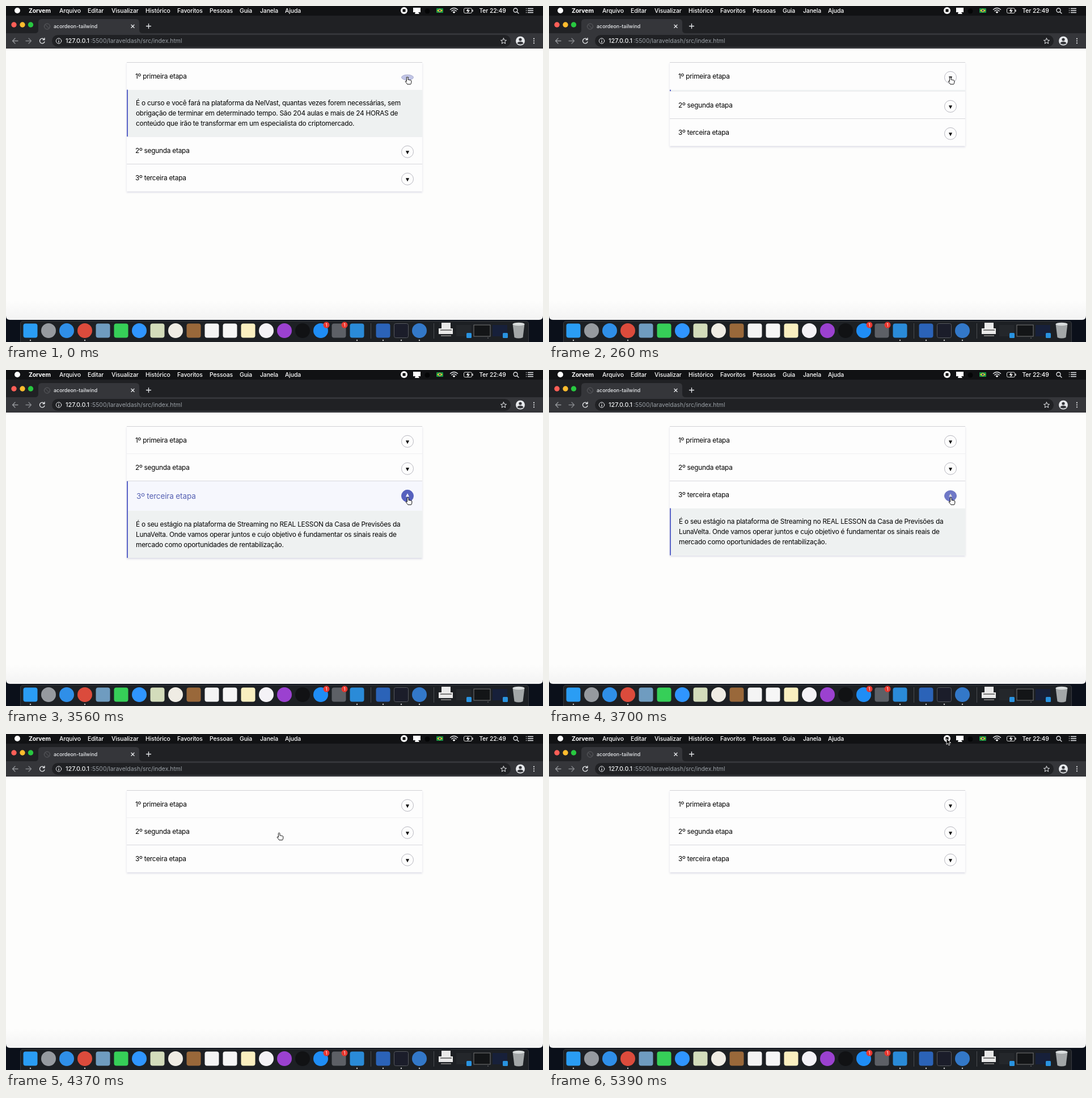
Write an HTML page that moves like this. It is 947 px wide and 592 px high and loops after 5420 ms.

```html
<!DOCTYPE html>
<html lang="pt-BR">
<head>
<meta charset="utf-8">
<title>Acordeon</title>
<style>
html, body { margin: 0; width: 100%; height: 100%; overflow: hidden; background: #0b101a; }
svg { display: block; width: 947px; height: 592px; }
text { font-family: Inter, Roboto, "Liberation Sans", sans-serif; white-space: pre; }
.menu text { font-size: 10.4px; fill: #fff; letter-spacing: -.01em; font-weight: 500; }
.card text { font-size: 11.85px; letter-spacing: -.02em; fill: #000; }
.line { fill: none; stroke: #e8eaed; stroke-width: 1.3; stroke-linecap: round; stroke-linejoin: round; }
</style>
</head>
<body>
<svg id="stage" viewBox="0 0 947 592">
  <defs>
    <linearGradient id="pageFill" x2="0" y2="1">
      <stop offset=".93" stop-color="#fdfdfc"/><stop offset="1" stop-color="#f3f3f3"/>
    </linearGradient>
    <filter id="shadow" x="-5%" y="-10%" width="110%" height="125%">
      <feDropShadow dx="0" dy="2" stdDeviation="1.8" flood-color="#3c3c78" flood-opacity=".18"/>
    </filter>
    <clipPath id="panelClip"><rect id="clipBox" x="213" width="521"/></clipPath>
  </defs>

  <rect width="947" height="592" fill="#0b101a"/>
  <path d="M0 75H947V546Q947 553 940 553H7Q0 553 0 546Z" fill="url(#pageFill)"/>

  <g id="menu" class="menu">
    <rect width="947" height="17" fill="#111214"/>
    <circle cx="20" cy="8" r="5" fill="#fff"/>
    <circle cx="702" cy="8" r="6" fill="#fff"/>
    <rect x="699.5" y="5.5" width="5" height="5" rx=".6" fill="#000"/>
    <path d="M718 3H731V11H727L729 14H721L722 11H718Z" fill="#fff"/>
    <circle cx="743" cy="9" r="4.5" fill="#050607"/>
    <rect x="759" y="4" width="12" height="8" rx="1" fill="#189447"/>
    <path d="M760 8L765 5 770 8 765 11Z" fill="#f5d327"/>
    <circle cx="765" cy="8" r="1.7" fill="#27408b"/>
    <path class="line" d="M783.5 6.3Q790 .6 796.5 6.3M785.8 8.7Q790 5 794.2 8.7"/>
    <path d="M787.5 10.5Q790 8.5 792.5 10.5L790 13Z" fill="#fff"/>
    <rect x="807.5" y="4" width="14" height="8.5" rx="2" fill="none" stroke="#ddd"/>
    <path d="M823 6.5V10" stroke="#ddd" stroke-width="1.5"/>
    <path d="M815.5 4L811.5 9H814.5L813.5 13 818 7.5H815Z" fill="#fff"/>
    <circle cx="898.5" cy="7.5" r="3.5" class="line"/><path class="line" d="M901 10.2L904 13"/>
    <path class="line" d="M920.5 4.5H929.5M920.5 8H929.5M920.5 11.5H929.5M917.5 4.5H917.6M917.5 8H917.6M917.5 11.5H917.6"/>
  </g>

  <g id="browser">
    <rect y="17" width="947" height="31" fill="#202124"/>
    <rect y="48" width="947" height="27" fill="#35363a"/>
    <path d="M51 48Q57 48 57 42V29Q57 23 63 23H229Q235 23 235 29V42Q235 48 241 48Z" fill="#35363a"/>
    <circle cx="14" cy="33" r="4.7" fill="#ff5f57"/>
    <circle cx="29" cy="33" r="4.7" fill="#febc2e"/>
    <circle cx="43.5" cy="33" r="4.7" fill="#28c840"/>
    <g fill="none" stroke="#5d5e62"><circle cx="72.5" cy="36" r="5"/><path d="M69 32.5L76 39.5"/></g>
    <text x="84" y="38.5" font-size="8.9" font-weight="500" fill="#e8eaed">acordeon-tailwind</text>
    <path class="line" d="M221 33.2L226 38.2M226 33.2L221 38.2M247.5 35.5H255.5M251.5 31.5V39.5"/>
    <path class="line" d="M21 61.5H11.5M16 57L11.5 61.5 16 66" style="stroke:#96989c"/>
    <path class="line" d="M35 61.5H44.5M40 57L44.5 61.5 40 66" style="stroke:#85878b"/>
    <path class="line" d="M67.5 59A4.4 4.4 0 1 0 68 63M68 56.5V59.5H65"/>
    <rect x="81" y="51" width="809" height="21" rx="10.5" fill="#202124"/>
    <circle cx="93" cy="61.5" r="4.7" class="line" style="stroke-width:1"/>
    <path class="line" d="M93 61.3V64M93 59V59.1"/>
    <text y="65.3" font-size="10.4" fill="#9aa0a6"><tspan x="105" fill="#f1f3f4" font-size="10.8" font-weight="500">127.0.0.1</tspan><tspan x="149">:5500/laraveldash/src/index.html</tspan></text>
    <path class="line" style="stroke-width:1" d="M877.5 56.7L879 60.1 882.5 60.4 879.8 62.7 880.7 66.2 877.5 64.3 874.3 66.2 875.2 62.7 872.5 60.4 876 60.1Z"/>
    <circle cx="907" cy="61.5" r="8" fill="#e8eaed"/>
    <circle cx="907" cy="59" r="2.6" fill="#35363a"/>
    <path d="M901.5 66Q902.5 62.7 907 62.7T912.5 66Q907 69.5 901.5 66Z" fill="#35363a"/>
    <g fill="#e8eaed"><circle cx="931" cy="57.7" r="1.1"/><circle cx="931" cy="61.5" r="1.1"/><circle cx="931" cy="65.3" r="1.1"/></g>
  </g>

  <g id="dock">
    <path d="M25.5 592V560Q25.5 555.5 30 555.5H917Q921.5 555.5 921.5 560V592" fill="#1d2024" stroke="#383b3f"/>
    <path d="M643.5 559V586M754.5 559V586" stroke="#484b4f"/>
  </g>

  <g id="card" class="card">
    <rect id="cardBox" x="213" y="99" width="521" fill="#fdfdfd" filter="url(#shadow)"/>
    <rect id="openHeader" x="213" width="521" fill="#f6f7fd"/>
    <g clip-path="url(#panelClip)">
      <rect id="panelBox" x="213" width="521" height="83" fill="#eef1f1"/>
      <text id="panelText"></text>
    </g>
    <rect id="accent" x="213" width="2" fill="#5a64c8"/>
    <path d="M213 99.5H734" stroke="#d2d2d6"/>
  </g>

  <path id="hand" fill="#fff" stroke="#111" stroke-linejoin="round" d="M-1.6 1Q-1.6-.3-.3-.3 1-.3 1 1V4.5Q2 3.8 3 4.8 4 4.2 4.9 5.2 6.2 4.8 6.8 6V9Q6.6 11 5.6 12.4H-.2Q-1.6 10.4-3.6 8-4 6.6-2.8 6.6L-1.6 7.6Z"/>
  <path id="arrow" fill="#000" stroke="#fff" stroke-width=".9" d="M0 0V10.5L2.5 8.2 4 12 6 11 4.4 7.6H7.6Z"/>
</svg>

<script>
const LOOP = 5420, TOP = 99.5, ROW = 48, OPEN_ROW = 52.5, PANEL = 83;
const FULL = 476;      // max-height of an open panel
const DURATION = 500;
const INDIGO = [86, 97, 190];

const titles = ["1º primeira etapa", "2º segunda etapa", "3º terceira etapa"];
const bodies = {
  0: ["É o curso e você fará na plataforma da NelVast, quantas vezes forem necessárias, sem",
      "obrigação de terminar em determinado tempo. São 204 aulas e mais de 24 HORAS de",
      "conteúdo que irão te transformar em um especialista do criptomercado."],
  2: ["É o seu estágio na plataforma de Streaming no REAL LESSON da Casa de Previsões da",
      "LunaVelta. Onde vamos operar juntos e cujo objetivo é fundamentar os sinais reais de",
      "mercado como oportunidades de rentabilização."]
};

const $ = id => document.getElementById(id);
function set(node, attrs) {
  for (const key in attrs) node.setAttribute(key, attrs[key]);
  return node;
}
function add(parent, tag, attrs, content = "") {
  const node = set(document.createElementNS("http://www.w3.org/2000/svg", tag), attrs);
  node.textContent = content;
  return parent.appendChild(node);
}
const clamp = v => Math.max(0, Math.min(1, v));
const mix = (from, to, k) => `rgb(${from.map((v, i) => Math.round(v + (to[i] - v) * k))})`;

// CSS "ease": cubic-bezier(.25, .1, .25, 1)
function ease(x) {
  x = clamp(x);
  let lo = 0, hi = 1;
  const curve = (a, b, s) => 3 * a * s * (1 - s) ** 2 + 3 * b * s * s * (1 - s) + s ** 3;
  for (let i = 0; i < 24; i++) {
    const mid = (lo + hi) / 2;
    if (curve(.25, .25, mid) < x) lo = mid; else hi = mid;
  }
  return curve(.1, 1, lo);
}

[["Zorvem", 40, 700], ["Arquivo", 94], ["Editar", 144], ["Visualizar", 186], ["Histórico", 246],
 ["Favoritos", 302], ["Pessoas", 359], ["Guia", 412], ["Janela", 448], ["Ajuda", 492], ["Ter 22:49", 834.5]]
  .forEach(([label, x, weight = 500]) => add($("menu"), "text", { x, y: 11.8, style: `font-weight:${weight}` }, label));

// Dock: "o" is a round icon, "s" a square one; a dot marks a running app
function buildDock() {
  const dock = $("dock");
  const icons = `s2a9df4. o969a9f o2f8fe8 odb4b3c. s6f9cc0 s36cf58 o2f95ff sd3dcbb oefece4 s99683a
    sf4f4f4 sf6f6f6 sfaefc0 of4f2f6 o9b41d0 o111214 o1f8df5 s5d6066 s2a8bd8.`.split(/\s+/);
  const recent = ["s2b63b8.", "s1b1d2a.", "o3378c8."];
  const icon = (spec, cx) => {
    const fill = "#" + spec.slice(1, 7);
    if (spec[0] === "o") add(dock, "circle", { cx, cy: 572, r: 13, fill });
    else add(dock, "rect", { x: cx - 12.5, y: 559.5, width: 25, height: 25, rx: 4, fill });
    if (spec[7]) add(dock, "circle", { cx, cy: 589, r: 1.2, fill: "#ccc" });
  };
  icons.forEach((spec, i) => icon(spec, 43 + i * 32));
  recent.forEach((spec, i) => icon(spec, 665 + i * 32));
  add(dock, "rect", { x: 684.5, y: 559.5, width: 25, height: 25, rx: 3, fill: "none", stroke: "#55585e" });
  for (const x of [565, 597]) {
    add(dock, "circle", { cx: x, cy: 562, r: 5.5, fill: "#e8372f" });
    add(dock, "text", { x, y: 565, "font-size": 8, fill: "#fff", "text-anchor": "middle" }, "1");
  }
  add(dock, "path", { d: "M768 558H784V568H788V578H763V568H768Z", fill: "#e9e9e9" });
  add(dock, "path", { d: "M766 571H786M767 581H785", stroke: "#777", "stroke-width": 2 });
  [["#24272b", 794], ["#131517", 825], ["#17203a", 858]].forEach(([fill, x], i) => {
    add(dock, "rect", { x, y: 562, width: i === 1 ? 29 : 26, height: 20, fill, stroke: i === 1 ? "#777" : "none" });
    if (i !== 1) add(dock, "rect", { x: x + 18, y: 576, width: 9, height: 9, rx: 1.5, fill: "#2993e0" });
  });
  add(dock, "circle", { cx: 850, cy: 585, r: .8, fill: "#888" });
  add(dock, "path", { d: "M893.5 560H914.5L911.5 584Q904 587 896.5 584Z", fill: "#a3a7a8" });
  add(dock, "ellipse", { cx: 904, cy: 560.5, rx: 10.5, ry: 2.8, fill: "#d9dddd" });
}
buildDock();

const rows = titles.map((title, i) => {
  const node = add($("card"), "g", {});
  if (i) add(node, "path", { d: "M213 0H734", stroke: i === 1 ? "#efeff1" : "#d8d8dc" });
  const label = add(node, "text", {}, title);
  const button = add(node, "g", { });
  return {
    node, label, button,
    disc: add(button, "circle", { r: 10.5 }),
    mark: add(button, "path", { d: "M-3-1.5H3L0 4.5Z" })
  };
});
const bodyLines = [0, 1, 2].map(() => add($("panelText"), "tspan", { x: 229 }));

// The last stretch of the second closing holds, then snaps shut
function accordionState(t) {
  if (t < 3560) return { active: 0, expanded: false, closed: ease((t + 187) / DURATION) };
  const clock = t < 3920 ? t : t < 4050 ? 3920 : LOOP;
  return { active: 2, expanded: clock < 3635, closed: ease((clock - 3635) / DURATION) };
}

const route = [[0, 708, 125.5], [3559.9, 708, 125.5], [3560, 709, 225], [4190, 709, 225], [4370, 482, 174.5],
  [4620, 462, 168], [4740, 462, 168], [5190, 692, 14], [5290, 692, 14], [5390, 701, 8], [LOOP, 701, 8]];
function cursorAt(t) {
  const i = Math.max(1, route.findIndex(stop => stop[0] > t));
  const [t0, x0, y0] = route[i - 1], [t1, x1, y1] = route[i];
  const k = (t - t0) / (t1 - t0);
  return [x0 + (x1 - x0) * k, y0 + (y1 - y0) * k];
}

function drawCard({ active, expanded, closed }) {
  const panelHeight = Math.round(Math.min(PANEL, FULL * (1 - closed)));
  let y = TOP;
  rows.forEach((row, i) => {
    const isActive = i === active, large = isActive && expanded;
    const turn = isActive ? closed : 1;
    set(row.node, { transform: `translate(0 ${y})` });
    set(row.label, { x: large ? 230 : 228, y: large ? 31.5 : 28.5 });
    row.label.style.cssText = large ? "font-size:13.5px;letter-spacing:-.01em;fill:#5661b3" : "";
    set(row.button, { transform: `translate(708 26.3) scale(1 ${-Math.cos(Math.PI * turn)})` });
    set(row.disc, { fill: mix(INDIGO, [253, 253, 253], turn), stroke: mix(INDIGO, [184, 184, 192], turn) });
    set(row.mark, { fill: mix([255, 255, 255], [0, 0, 0], turn) });
    const headerTop = y;
    y += large ? OPEN_ROW : ROW;
    if (!isActive) return;
    set($("openHeader"), { y: headerTop, height: large ? OPEN_ROW : 0 });
    set($("panelBox"), { y });
    set($("clipBox"), { y, height: panelHeight });
    const accentTop = large ? headerTop : y;
    set($("accent"), { y: accentTop, height: y + panelHeight - accentTop });
    bodyLines.forEach((line, n) => {
      line.textContent = bodies[active][n];
      set(line, { y: y + 27.5 + n * 18 });
    });
    y += panelHeight;
  });
  set($("cardBox"), { height: y - 99 });
}

function drawCursor(t) {
  const [x, y] = cursorAt(t);
  const overCard = x > 213 && x < 734 && y > 99 && y < 244;
  const transform = `translate(${x} ${y})`;
  set($("hand"), { transform, visibility: overCard ? "visible" : "hidden" });
  set($("arrow"), { transform, visibility: overCard ? "hidden" : "visible" });
}

function render(t) {
  drawCard(accordionState(t));
  drawCursor(t);
}

const start = performance.now();
function tick() {
  render((performance.now() - start) % LOOP);
  requestAnimationFrame(tick);
}
render(0);
requestAnimationFrame(tick);
</script>
</body>
</html>
```
